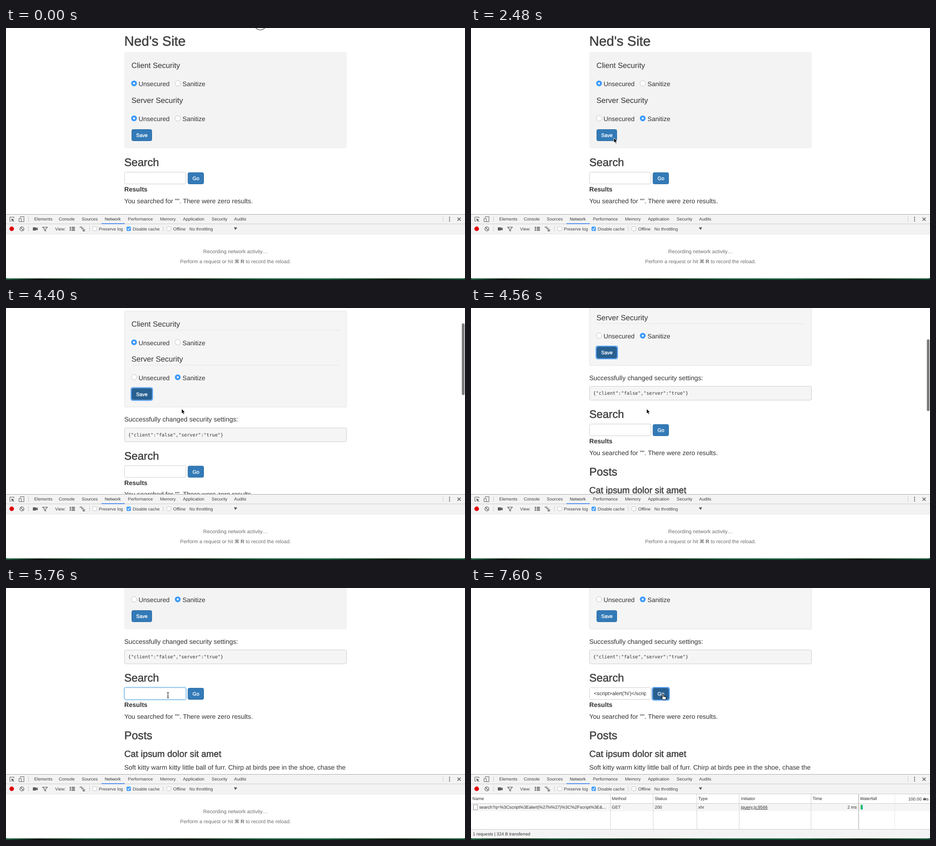
An HTML page for the animation above (8 s loop, 1009 by 555 pixels).

```html
<!DOCTYPE html>
<html lang="en">
<head>
<meta charset="utf-8">
<title>Search form</title>
<style>
html, body { margin: 0; width: 100%; height: 100%; overflow: hidden; background: #fff; }
svg { display: block; }
text { font-family: "Liberation Sans", Arial, sans-serif; fill: #333; text-rendering: geometricPrecision; white-space: pre; }
.medium { fill: #404040; stroke: #404040; stroke-width: .55px; }
.mono { font-family: "DejaVu Sans Mono", monospace; }
.label { fill: #fff; stroke: #fff; stroke-width: .35px; }
.bold { font-weight: bold; }
.tool { fill: #444; }
.hint { fill: #6e6e6e; }
.icon { fill: none; stroke: #5a5a5a; }
.solid { fill: #5a5a5a; }
.rule { stroke: #ccc; }
</style>
</head>
<body>
<svg id="stage" width="1009" height="555" viewBox="0 0 1009 555"></svg>
<script>
const LOOP = 8000, STEP = 80, INSERT = 76;

const text = (x, y, size, str, cls = '', extra = '') =>
  `<text x="${x}" y="${y}" font-size="${size}" class="${cls}" ${extra}>${str}</text>`;
const rect = (x, y, w, h, fill, extra = '') =>
  `<rect x="${x}" y="${y}" width="${w}" height="${h}" fill="${fill}" ${extra}/>`;
const line = (x1, y1, x2, y2, color = '#ccc') =>
  `<path d="M${x1} ${y1}L${x2} ${y2}" stroke="${color}" fill="none"/>`;
const path = (d, cls, extra = '') => `<path d="${d}" class="${cls}" ${extra}/>`;
const group = (id, body, extra = '') => `<g id="${id}" ${extra}>${body}</g>`;

const radioOff = (x, y) => `<circle cx="${x}" cy="${y}" r="6" fill="#fff" stroke="#c2c2c2"/>`;
const radioOn = (x, y) => `<circle cx="${x}" cy="${y}" r="6.3" fill="#3b99fc"/><circle cx="${x}" cy="${y}" r="2.2" fill="#fff"/>`;
const choices = y => text(291.5, y + 6, 14.1, 'Unsecured') + text(388, y + 6, 14.1, 'Sanitize');

const button = (id, x, y, w, label, labelX) =>
  group(id + 'Focus', rect(x - 1, y - 1, w + 2, 28, 'none', 'rx="3.5" stroke="#5fa4f5" stroke-width="2.2"')) +
  rect(x + .5, y + .5, w - 1, 25, '#337ab7', `rx="3" stroke="#2e6da4" id="${id}Face"`) +
  text(labelX, y + 17, 11.1, label, 'label');

const checkbox = (x, on) => on
  ? rect(x, 437.5, 9.5, 9.5, '#3b99fc', 'rx="2"') + `<path d="M${x + 2} 442.3l2.1 2.3 3.5-5" fill="none" stroke="#fff" stroke-width="1.4"/>`
  : rect(x + .5, 437.5, 9, 9, '#fff', 'rx="2" stroke="#c4c4c4"');

function form() {
  return text(260, 39, 29.8, "Ned's Site", 'medium') +
    rect(260, 53, 489, 212, '#f3f3f3', 'rx="3"') +
    group('crisp', rect(260.5, 53.5, 488, 211, '#f5f5f5', 'rx="3" stroke="#e3e3e3"') +
      line(276, 95.5, 733, 95.5, '#e5e5e5') + line(276, 172.5, 733, 172.5, '#e5e5e5')) +
    text(275.7, 87.7, 16.6, 'Client Security') + radioOn(281.5, 122) + radioOff(377.5, 122) + choices(122) +
    text(275.7, 164.7, 16.6, 'Server Security') + choices(199) +
    group('before', radioOn(281.5, 199) + radioOff(377.5, 199)) +
    group('after', radioOff(281.5, 199) + radioOn(377.5, 199)) +
    button('save', 276, 223, 45, 'Save', 286) +
    group('message', text(260, 296.5, 14.38, 'Successfully changed security settings:') +
      rect(260.5, 310.5, 488, 30.5, '#f5f5f5', 'rx="3" stroke="#ccc"') +
      text(268.5, 329.3, 10.22, '{"client":"false","server":"true"}', 'mono'));
}

function searchAndPosts() {
  const query = "&lt;script&gt;alert('hi')&lt;/script&gt;";
  return text(260, 304, 24.1, 'Search', 'medium') +
    group('inputGlow', rect(259.5, 316.5, 137, 28, 'none', 'rx="4" stroke="#66afe9" stroke-opacity=".3" stroke-width="3"')) +
    rect(260.5, 317.5, 135, 26, '#fff', 'rx="3" stroke="#ccc" id="input"') +
    group('query', text(384, 334.3, 11.3, query, '', 'id="queryEnd" text-anchor="end"') +
      text(270, 334.3, 11.3, query, '', 'id="queryStart"'), 'clip-path="url(#field)"') +
    rect(0, 324, 1, 13, '#333', 'id="caret"') +
    button('go', 399.5, 318, 35.5, 'Go', 410) +
    text(260, 360.3, 14.1, 'Results', 'bold') +
    text(260, 385.7, 14.25, 'You searched for "". There were zero results.') +
    text(260, 431, 24.6, 'Posts', 'medium') +
    text(260, 470, 19.8, 'Cat ipsum dolor sit amet', 'medium') +
    text(260, 498, 14.39, 'Soft kitty warm kitty little ball of furr. Chirp at birds pee in the shoe, chase the');
}

function toolbars() {
  const tabs = { Elements: 62, Console: 116, Sources: 166.5, Network: 217, Performance: 268, Memory: 338.5, Application: 389, Security: 452, Audits: 501.5 };
  return rect(0, 410, 1009, 141, '#fff') + rect(0, 410, 1009, 43, '#f3f3f3') +
    line(0, 410.5, 1009, 410.5, '#a8a8a8') + line(0, 431.5, 1009, 431.5) + line(0, 453.5, 1009, 453.5, '#e2e2e2') +
    Object.entries(tabs).map(([name, x]) => text(x, 424.3, 9.6, name, name === 'Network' ? '' : 'tool')).join('') +
    rect(210, 430, 51, 1.7, '#4285f4') +
    path('M11 425.5H8.5V416.5H17.5V419', 'icon') + path('M11.5 419.5l6.5 2.7-2.6 1 2.5 2.6-1.1 1.1-2.5-2.6-1 2.2z', 'solid') +
    path('M31.5 418V415.5H39.5V426.5H34M28.5 419.5H33.5V426.5H28.5Z', 'icon') +
    [49.5, 960.5].map(x => line(x, 415, x, 427)).join('') +
    [417, 421, 425].map(y => `<circle cx="975" cy="${y}" r="1.2" class="solid"/>`).join('') +
    path('M992.5 417.5l7 7m0-7l-7 7', 'icon', 'stroke-width="1.5"') +
    '<circle cx="12.5" cy="442.3" r="5" fill="#e00000"/>' +
    '<circle cx="35" cy="442.5" r="4.4" class="icon" stroke-width="1.3"/>' + path('M32 439.5l6 6', 'icon', 'stroke-width="1.3"') +
    path('M59 439h7v2l3.5-2v7l-3.5-2v2h-7z', 'solid') +
    path('M80.5 438.5h10.5l-4 4.5v4l-2.5-1.2v-2.8z', 'icon', 'stroke-width="1.2"') +
    path('M140 438h3v2h-3zM144.5 438h7v2h-7zM140 441.3h3v2h-3zM144.5 441.3h7v2h-7zM140 444.6h3v2h-3zM144.5 444.6h7v2h-7z', 'solid') +
    path('M162 438.5h6M165 441.5h6M168 444.5h6M168.5 447h5', 'icon', 'stroke-width="1.5"') +
    [49.5, 183.5, 345.5].map(x => line(x, 436, x, 448)).join('') +
    text(108, 445.5, 9.5, 'View:', 'tool') +
    checkbox(190) + text(204, 445.5, 9.45, 'Preserve log', 'tool') +
    checkbox(265, true) + text(278.5, 445.5, 9.45, 'Disable cache', 'tool') +
    checkbox(353) + text(367.5, 445.5, 9.5, 'Offline', 'tool') +
    text(403, 445.5, 9.6, 'No throttling', 'tool') + path('M501 439h7l-3.5 6z', 'solid');
}

function network() {
  const heads = { Name: 3, Method: 309.5, Status: 404, Type: 499.5, Initiator: 593.5, Time: 751, Waterfall: 855 };
  const hint = text(504.5, 495.7, 11.2, 'Recording network activity…', 'hint', 'text-anchor="middle"') +
    text(504.5, 517.8, 11.1, 'Perform a request or hit <tspan class="bold" font-family="DejaVu Sans, sans-serif">⌘</tspan><tspan class="bold"> R</tspan> to record the reload.', 'hint', 'text-anchor="middle"');
  const table = rect(0, 475, 1009, 16.5, '#f5f5f5') + line(0, 453.5, 1009, 453.5) + line(0, 474.5, 1009, 474.5) +
    [306.5, 400.5, 496.5, 589.5, 747.5].map(x => line(x, 454, x, 531, '#d2d2d2')).join('') +
    line(931.5, 454, 931.5, 531, '#e6e6e6') + line(852, 454, 852, 531, '#9a9a9a') +
    Object.entries(heads).map(([name, x]) => text(x, 466.8, 9.55, name)).join('') +
    text(1006, 467.8, 9.6, '100.00 ms', '', 'text-anchor="end"') + path('M994 467h7l-3.5-6z', 'solid') +
    rect(5.5, 477.5, 8.5, 11, '#fff', 'stroke="#8f8f8f"') +
    text(18, 486, 9.65, 'search?q=%3Cscript%3Ealert(%27hi%27)%3C%2Fscript%3E&amp;...') +
    text(309.5, 486, 9.5, 'GET') + text(404, 486, 9.5, '200') + text(499.5, 486, 9.5, 'xhr') +
    text(593.5, 486, 9.5, 'jquery.js:9566', '', 'text-decoration="underline"') +
    text(848, 486, 9.5, '2 ms', '', 'text-anchor="end"') +
    rect(856, 478, 1, 10, '#bbb') + rect(857, 477.5, 3, 10.5, '#00c853') + rect(860, 477.5, 1.2, 10.5, '#22a5d8') +
    rect(0, 531, 1009, 20, '#f3f3f3') + line(0, 531.5, 1009, 531.5) +
    text(4, 545, 9.55, '1 requests | 324 B transferred');
  return group('hint', hint) + group('table', table);
}

const pointers =
  group('ring', '<circle r="13.3" fill="none" stroke="#222" stroke-width="1.1"/>') +
  group('arrow', '<path d="M0 0V10.8L2.5 8.5L4.3 12.4L6.2 11.5L4.5 7.8H7.8Z" fill="#000" stroke="#fff" stroke-width=".9"/>') +
  group('beam', '<path d="M-2.5-6Q0-6 0-4.5Q0-6 2.5-6M0-5V5M-2.5 6Q0 6 0 4.5Q0 6 2.5 6M-1.2 2H1.2" fill="none" stroke="#222" stroke-width="1.1"/>') +
  group('hand', '<path d="M-1.3.8Q0-.6 1.2.8V5Q2.6 4 3.4 5.3Q4.8 4.6 5.4 5.8Q7 5.4 7 7V9.2L5.8 12H0L-3.6 7.5Q-3.6 5.8-1.3 7.2Z" fill="#fff" stroke="#000" stroke-width="1.1" stroke-linejoin="round"/>');

document.getElementById('stage').innerHTML = `<defs>
    <clipPath id="view"><rect width="1009" height="410"/></clipPath>
    <clipPath id="field"><rect x="269.5" y="318" width="115.5" height="25"/></clipPath>
    <linearGradient id="desk"><stop stop-color="#1a5a3c"/><stop offset=".07" stop-color="#08150f"/><stop offset=".18" stop-color="#10452b"/>
      <stop offset=".4" stop-color="#06170f"/><stop offset=".55" stop-color="#114a2e"/><stop offset=".7" stop-color="#135434"/><stop offset=".85" stop-color="#07180f"/><stop offset="1" stop-color="#12482f"/></linearGradient>
  </defs>` +
  rect(0, 546, 1009, 9, 'url(#desk)') + rect(0, -10, 1009, 561.5, '#fff', 'rx="4"') +
  group('', group('page', form() + group('lower', searchAndPosts())), 'clip-path="url(#view)"') +
  rect(1002, 0, 6, 158, '#7d7d7d', 'rx="3" id="thumb"') + toolbars() + network() + pointers;

// Rows of [time, value, ...]
const SCROLL = [[4240, 0], [4320, 10], [4400, 46.5], [4480, 96], [4560, 138], [4640, 165], [4720, 174]];
const POINTER = [
  [0, 559, -9], [640, 559, -9], [720, 541, 27], [1280, 379, 207], [2000, 379, 207],
  [2240, 332, 236], [2400, 318, 240], [2480, 314, 242], [3120, 314, 242], [3360, 380, 225],
  [3760, 384, 223], [3840, 386, 222], [4880, 386, 222], [5200, 356, 236], [6640, 356, 236],
  [6880, 468, 219], [7040, 462, 221], [7280, 422, 234]
];
const FADE = [[5520, 1], [5760, 0]];

function sample(rows, t) {
  const i = rows.findIndex(row => row[0] > t);
  if (i < 0) return rows.at(-1).slice(1);
  if (i === 0) return rows[0].slice(1);
  const [a, b] = [rows[i - 1], rows[i]], k = (t - a[0]) / (b[0] - a[0]);
  return a.slice(1).map((v, n) => v + (b[n + 1] - v) * k);
}

const el = {};
document.querySelectorAll('#stage [id]').forEach(node => el[node.id] = node);
const show = (id, on) => el[id].style.display = on ? '' : 'none';
const move = (id, x, y) => el[id].setAttribute('transform', `translate(${x} ${y})`);

function render(now) {
  const t = Math.floor(now % LOOP / STEP) * STEP;
  const within = (a, b = LOOP) => t >= a && t < b;
  const [scroll] = sample(SCROLL, t), [x, y] = sample(POINTER, t);

  move('page', 0, -scroll);
  move('lower', 0, within(2720) ? INSERT : 0);
  move('thumb', 0, 16 + scroll * .384);
  el.thumb.style.opacity = sample(FADE, t)[0];
  show('thumb', within(4320));
  show('crisp', within(3200, 4960) || within(7600));
  show('before', t < 1440);
  show('after', t >= 1440);
  show('message', within(2720));

  const saveFocus = within(2640, 5360), goFocus = within(7360), typing = within(5360, 7360);
  show('saveFocus', saveFocus);
  show('goFocus', goFocus);
  el.saveFace.setAttribute('fill', saveFocus || within(2560, 2640) ? '#286090' : '#337ab7');
  el.goFace.setAttribute('fill', within(7200) ? '#286090' : '#337ab7');
  show('inputGlow', typing);
  el.input.setAttribute('stroke', typing ? '#66afe9' : '#ccc');
  show('queryEnd', within(6000, 7360));
  show('queryStart', within(7360));
  el.caret.setAttribute('x', t < 6000 ? 270 : 383.5);
  show('caret', within(5440, 5760) || within(6000, 6480) || within(6960, 7360));
  show('table', within(7600));
  show('hint', t < 7600);

  const beam = within(5120, 6000) || within(6720, 6800), hand = within(2560, 3200) || within(7200);
  show('beam', beam);
  show('hand', hand);
  show('arrow', !beam && !hand && (within(720, 6000) || within(6800)));
  show('ring', t < 80 || within(1440, 1600) || within(2560, 2720) || within(5360, 5440) || within(7360, 7520));
  for (const id of ['beam', 'hand', 'arrow', 'ring']) move(id, x, y);
}

const start = performance.now();
function tick() {
  render(performance.now() - start);
  requestAnimationFrame(tick);
}
tick();
</script>
</body>
</html>
```
